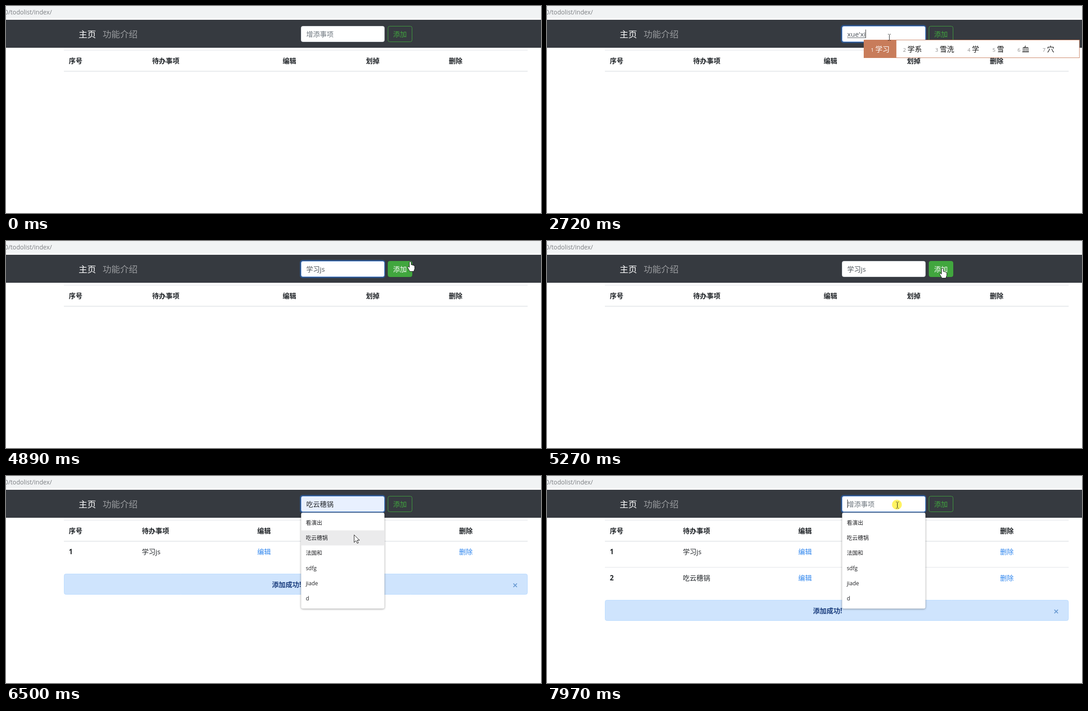
An HTML page with a canvas for the animation above (8000 ms loop, 1201 px wide and 466 px high).

```html
<!DOCTYPE html>
<html lang="zh-CN">
<head>
<meta charset="utf-8">
<title>待办事项</title>
<style>
html, body { margin: 0; width: 100%; height: 100%; overflow: hidden; background: #fff; }
canvas { display: block; }
</style>
</head>
<body>
<canvas id="stage" width="1201" height="466"></canvas>
<script>
const ctx = document.getElementById('stage').getContext('2d');
const FAMILY = '"Open Sans", "Noto Sans CJK SC", "Noto Sans CJK", sans-serif';
const LOOP = 8000, STEP = 77.6, SIZE = 15.3;
const GREEN = '#41a63e', INK = '#212529', LINK = '#2f86ee', LINE = '#dee2e6', IME = '#c87c5a';
const DINNER = '吃云穗锅';
const HISTORY = ['看演出', DINNER, '法国和', 'sdfg', 'jiade', 'd'];

// Pointer path: time, x, y
const PATH = [
  [70, 1135, 520], [145, 1099, 455], [455, 930, 220], [690, 800, 85], [765, 768, 70],
  [4336, 768, 70], [4413, 900, 130], [4491, 1018, 176], [4600, 1018, 176],
  [4801, 915, 38], [4879, 907, 46], [4960, 887, 61], [5422, 887, 61],
  [5655, 822, 66], [5733, 806, 70], [5888, 801, 72], [5965, 795, 95],
  [6276, 781, 130], [6354, 781, 132], [6900, 781, 132],
  [7286, 884, 68], [7440, 886, 62], [7580, 884, 62], [7673, 834, 64], [7828, 786, 65]
];
const PRESSES = [[830, 1000], [5100, 5200], [5720, 5800], [6890, 6960], [7510, 7600], [7820, 8100]];
const FOCUS = [[850, 5100], [5720, 7510], [7820, 8100]];
const DROPDOWN = [[915, 2225], [5720, 6890], [7880, 8100]];
const RELOADS = [5340, 7570];

// Input content: start, committed text, text being composed, candidates
const TYPING = [
  [0, '', ''],
  [2150, '', 'x', '想 下 小 些 先 像 向'],
  [2300, '', 'xu', '需 许 续 须 徐 虚 序'],
  [2385, '', 'xue', '学 雪 血 穴 薛 靴 削'],
  [2620, '', "xue'x", '学习 学校 学线 学下 学些 学 雪'],
  [2700, '', "xue'xi", '学习 学系 雪洗 学 雪 血 穴'],
  [3080, '学习', ''],
  [3315, '学习', 'j', '就 将 及 加 叫 家 级'],
  [3705, '学习', "j's", '技术 介绍 就是 接受 建设 加上 及时'],
  [3935, '学习js', ''],
  [5340, '', ''],
  [6890, DINNER, ''],
  [7570, '', '']
];
const BLINKS = [850, 5720, 5960, 7820, ...TYPING.slice(1).map(s => s[0])].sort((a, b) => a - b);

const CURSORS = {
  arrow: new Path2D('M0 0V17L4 13L7 19L9.5 18L6.8 12H12Z'),
  hand: new Path2D('M-2 1Q0-1 2 1V7Q4 6 5 8Q7 7 8 9Q10 9 10 11V16Q9 18 8 22H-1Q-3 18-6 13Q-6 10-3 12L-2 13Z'),
  beam: new Path2D('M-3-7H-1M1-7H3M0-6V6M-3 7H-1M1 7H3')
};

const active = (spans, t) => spans.find(([from, to]) => t >= from && t < to);
const inside = (p, x, y, w, h) => p.x >= x && p.x <= x + w && p.y >= y && p.y <= y + h;

function pointerAt(t) {
  const i = PATH.findIndex(k => k[0] > t);
  if (i === 0) return { x: PATH[0][1], y: PATH[0][2] };
  if (i < 0) return { x: PATH.at(-1)[1], y: PATH.at(-1)[2] };
  const [t0, x0, y0] = PATH[i - 1], [t1, x1, y1] = PATH[i];
  const k = (t - t0) / (t1 - t0);
  return { x: Math.round(x0 + (x1 - x0) * k), y: Math.round(y0 + (y1 - y0) * k) };
}

function rect(x, y, w, h, color) {
  ctx.fillStyle = color;
  ctx.fillRect(x, y, w, h);
}

function box(x, y, w, h, fill, border, r = 4) {
  ctx.beginPath();
  ctx.roundRect(x + .5, y + .5, w - 1, h - 1, r);
  if (fill) { ctx.fillStyle = fill; ctx.fill(); }
  if (border) { ctx.strokeStyle = border; ctx.lineWidth = 1; ctx.stroke(); }
}

// Draws text centred on a row and returns where it ends
function label(text, x, cy, color, size = SIZE, weight = 400) {
  ctx.font = `${weight} ${size}px ${FAMILY}`;
  ctx.fillStyle = color;
  ctx.fillText(text, x, cy + size * .37);
  return x + ctx.measureText(text).width;
}

function drawTable(rows) {
  const cols = rows ? [141, 305, 564, 728, 1017] : [141, 328, 621, 808, 994];
  rect(130, 99, 1041, 1, LINE);
  rect(130, 146, 1041, 1.5, LINE);
  ['序号', '待办事项', '编辑', '划掉', '删除'].forEach((name, i) => label(name, cols[i], 123, INK, SIZE, 700));
  ['学习js', DINNER].slice(0, rows).forEach((item, i) => {
    const y = 170 + i * 59;
    if (i) rect(130, y - 24, 1041, 1, LINE);
    label(String(i + 1), cols[0], y, INK, SIZE, 700);
    label(item, cols[1], y, INK);
    label('编辑', cols[2], y, LINK);
    box(728, y - 12, 70, 36, null, GREEN);
    label('已完成', 740.5, y + 6.5, GREEN);
    label('删除', cols[4], y, LINK);
  });
  if (rows) drawAlert(161 + rows * 59);
}

function drawAlert(y) {
  box(130, y, 1041, 47, '#cfe4fd', '#b8daff');
  label('添加成功!', 597, y + 24, '#1c3f7f', SIZE, 700);
  ctx.strokeStyle = '#6b9cd3';
  ctx.lineWidth = 1.8;
  ctx.beginPath();
  ctx.moveTo(1139, y + 22); ctx.lineTo(1147, y + 30);
  ctx.moveTo(1147, y + 22); ctx.lineTo(1139, y + 30);
  ctx.stroke();
}

function drawNav(hover) {
  rect(0, 0, 1201, 27, '#f1f3f4');
  label('0', -3, 14, '#7b7e82', 13.7);
  label('/todolist/index/', 5, 14, '#7b7e82', 13.7);
  rect(0, 31, 1201, 63, '#363a40');
  label('主页', 163, 63.5, '#fff', 19.6);
  label('功能介绍', 217, 63.5, '#9b9da0', 19.6);
  box(857, 45, 55, 36, hover ? GREEN : null, GREEN);
  label('添加', 869, 63.5, hover ? '#fff' : GREEN);
}

function drawInput(t, typed, preview) {
  const focus = active(FOCUS, t);
  const [, text, draft] = typed;
  const filled = preview || text === DINNER;
  if (focus) {
    const glow = Math.min(1, (t - focus[0]) / 150);
    box(659, 42, 193, 42, `rgba(30,115,235,${.38 * glow})`, null, 6);
  }
  box(662, 45, 188, 36, filled ? '#e8f0fe' : '#fff', focus ? '#5f95e0' : '#ced4da');
  let end = 674;
  if (preview || text) end = label(preview || text, 674, 63, filled ? INK : '#495057');
  else if (!draft) label('增添事项', 674, 63, '#6c757d');
  if (preview) end = 674;
  if (draft) {
    const start = end;
    end = label(draft, start, 63, '#495057');
    rect(start, 71, end - start, 1, '#495057');
  }
  const blink = BLINKS.findLast(b => b <= t);
  if (focus && (t - blink) % 1060 < 530) rect(Math.floor(end), 53, 1, 19, '#222');
  return end;
}

function drawDropdown(hovered) {
  ctx.save();
  ctx.shadowColor = 'rgba(0,0,0,.4)';
  ctx.shadowBlur = 4;
  ctx.shadowOffsetY = 1;
  box(662, 82, 188, 217, '#fff', null);
  ctx.restore();
  if (hovered >= 0) rect(662, 88.5 + hovered * 33.9, 188, 33.9, '#ebebec');
  HISTORY.forEach((item, i) => label(item, 673, 105.7 + i * 33.9, '#202124', 12.3));
}

function drawCandidates(x, list) {
  const words = list.split(' ');
  const widths = words.map(w => 40.1 + w.length * 16.1);
  const total = widths.reduce((a, b) => a + b, 43);
  rect(x, 76, total, 41, IME);
  rect(x + 1, 77, total - 2, 39, '#fff');
  rect(x, 76, widths[0] + 1, 41, IME);
  words.forEach((word, i) => {
    label(String(i + 1), x + 16, 98.5, i ? '#888' : '#fff', 11.5);
    label(word, x + 26, 97.5, i ? '#111' : '#fff', 16.1);
    x += widths[i];
  });
}

function drawPointer(p, kind, pressed) {
  if (pressed) {
    ctx.fillStyle = 'rgba(255,241,70,.85)';
    ctx.beginPath();
    ctx.arc(p.x - .5, p.y - .5, 11, 0, Math.PI * 2);
    ctx.fill();
  }
  ctx.save();
  ctx.translate(p.x + .5, p.y + .5);
  ctx.lineWidth = 1;
  ctx.strokeStyle = '#111';
  ctx.fillStyle = '#fff';
  if (kind !== 'beam') ctx.fill(CURSORS[kind]);
  ctx.stroke(CURSORS[kind]);
  ctx.restore();
}

function draw(ms) {
  const t = Math.max(0, Math.floor((ms + 24) / STEP) * STEP - 10);
  const p = pointerAt(t);
  const open = active(DROPDOWN, t);
  const typed = TYPING.findLast(s => s[0] <= t);
  const onButton = inside(p, 857, 45, 55, 36);
  const kind = onButton ? 'hand' : inside(p, 662, 45, 188, 36) ? 'beam' : 'arrow';
  const hovered = open && inside(p, 662, 89, 188, 203) ? Math.floor((p.y - 88.5) / 33.9) : -1;

  rect(0, 0, 1201, 466, '#fff');
  drawTable(RELOADS.filter(r => t >= r).length);
  drawNav(onButton);
  const end = drawInput(t, typed, HISTORY[hovered]);
  if (open) drawDropdown(hovered);
  if (typed[3]) drawCandidates(Math.floor(end - 4), typed[3]);
  drawPointer(p, kind, active(PRESSES, t));
}

let origin;
function frame(now) {
  origin ??= now;
  draw((now - origin) % LOOP);
  requestAnimationFrame(frame);
}
draw(0);
requestAnimationFrame(frame);
</script>
</body>
</html>
```
